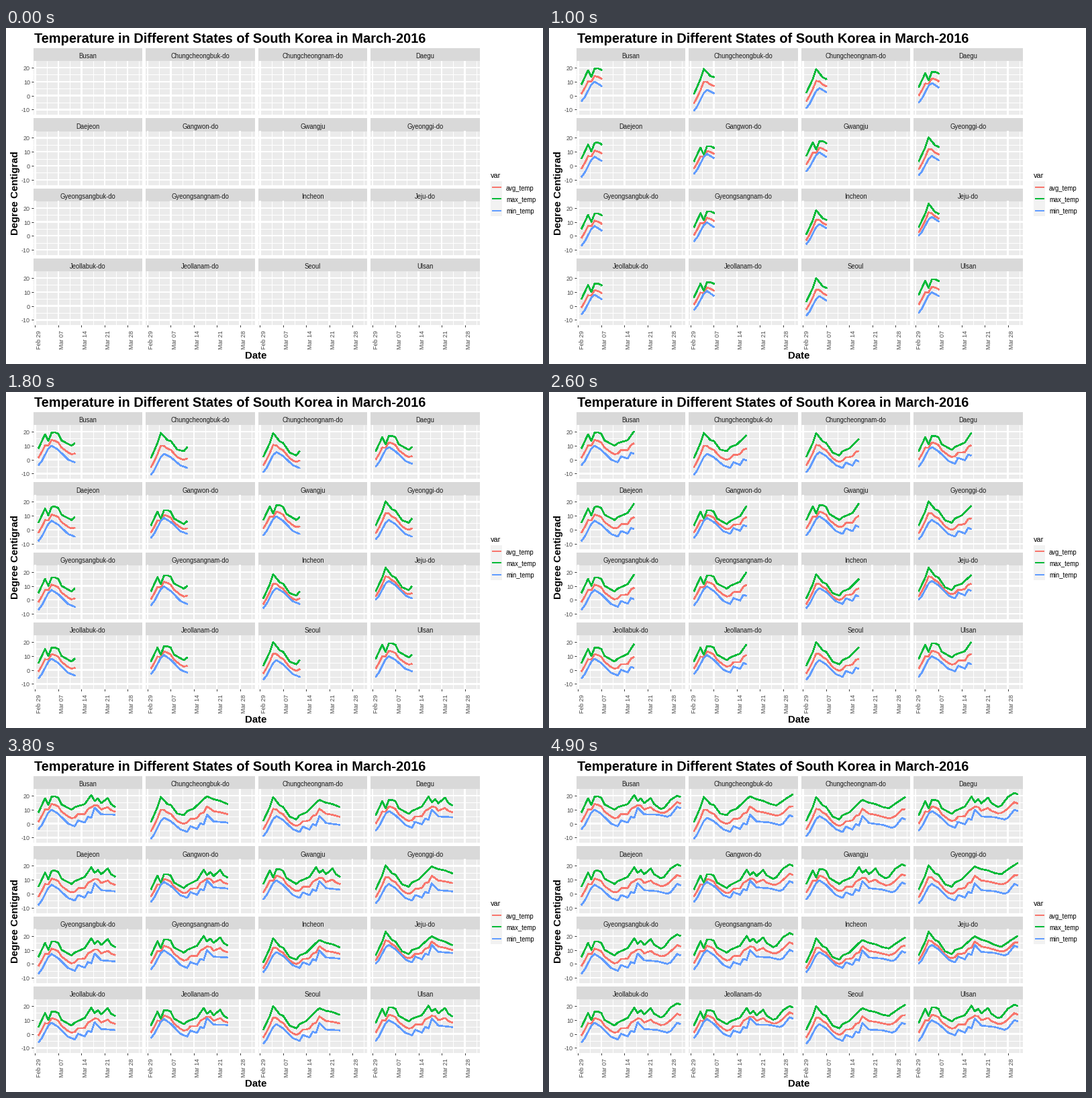
These frames come from a looping animation (800 px wide and 500 px high, 5 s). A matplotlib script:

```python
import numpy as np
import matplotlib.pyplot as plt
from matplotlib.animation import FuncAnimation
from matplotlib.collections import LineCollection
from matplotlib.patches import Rectangle

plt.rcParams["font.family"] = "Liberation Sans"

WIDTH, HEIGHT, DPI = 800, 500, 72
FRAMES, INTERVAL = 50, 100
DAYS = np.arange(1, 32)
WEEKS = range(0, 29, 7)
RED, GREEN, BLUE = "#F8766D", "#00BA38", "#619CFF"

LEFT, TOP = 41.0, 49.2
PITCH_X, PITCH_Y = 167.45, 104.33
PANEL_W, PANEL_H, STRIP_H = 162.3, 80.0, 19.2
DAY_MIN, DAY_SPAN = -0.5, 33
TEMP_MAX, TEMP_SPAN = 24.75, 38.5

# Turning points of the weather, day: degrees
WEST = {1: 3, 3: 13, 4: 20, 5: 17, 6: 14, 7: 13, 9: 6, 11: 4, 12: 7, 14: 9, 17: 16,
        18: 18, 20: 16, 22: 15, 24: 13, 26: 12, 29: 17, 31: 20}
EAST = {1: 6, 3: 16, 4: 11, 5: 17, 6: 17, 7: 16, 8: 11, 11: 7, 12: 9, 15: 12, 17: 19,
        18: 15, 19: 17, 20: 14, 22: 18, 23: 14, 25: 11, 26: 12, 28: 18, 30: 21, 31: 20}
LOWS = {1: -5, 2: -2, 4: 7, 5: 9, 7: 6, 10: -1, 12: -3, 13: 1, 15: -1, 16: 3, 17: 2,
        18: 9, 20: 4, 24: 3, 27: 1, 28: 2, 30: 8, 31: 7}

# Each state departs from that by a shift on these days, for highs and lows
SHIFT_DAYS = (1, 11, 27)
STATES = {
    "Busan": (EAST, (2, 3, -1), (1, 1, 4)),
    "Chungcheongbuk-do": (WEST, (-2, 2, 1), (-6, -3, -2)),
    "Chungcheongnam-do": (WEST, (-1, -1, -1), (-4, -3, -4)),
    "Daegu": (EAST, (0, 0, 1), (0, 0, 2)),
    "Daejeon": (EAST, (-1, 0, 0), (-3, -2, -1)),
    "Gangwon-do": (EAST, (-3, -3, 0), (-1, 0, 1)),
    "Gwangju": (EAST, (1, 0, 0), (1, 0, 0)),
    "Gyeonggi-do": (WEST, (0, 1, 2), (-2, -2, -1)),
    "Gyeongsangbuk-do": (EAST, (-1, -1, 0), (-2, -2, -1)),
    "Gyeongsangnam-do": (EAST, (0, 1, 1), (1, 0, 2)),
    "Incheon": (WEST, (-2, -1, -1), (-1, 0, 1)),
    "Jeju-do": (WEST, (3, 3, 0), (5, 4, 5)),
    "Jeollabuk-do": (EAST, (-1, -1, 1), (-1, -1, 0)),
    "Jeollanam-do": (EAST, (0, 0, -1), (2, 1, 4)),
    "Seoul": (WEST, (0, 0, 1), (-2, -2, 0)),
    "Ulsan": (EAST, (2, 2, 0), (0, 2, 2)),
}

fig = plt.figure(figsize=(WIDTH / DPI, HEIGHT / DPI), dpi=DPI, facecolor="white")
ax = fig.add_axes([0, 0, 1, 1])
ax.set(xlim=(0, WIDTH), ylim=(HEIGHT, 0))
ax.axis("off")


def panel_origin(index):
    row, col = divmod(index, 4)
    return LEFT + col * PITCH_X, TOP + row * PITCH_Y


def day_x(left, day):
    return left + (day - DAY_MIN) / DAY_SPAN * PANEL_W


def temp_y(top, temp):
    return top + (TEMP_MAX - temp) / TEMP_SPAN * PANEL_H


def rect(x, y, w, h, color):
    ax.add_patch(Rectangle((x, y), w, h, fc=color, lw=0, zorder=0))


def lines(segments, color, width, **style):
    ax.add_collection(LineCollection(segments, colors=color, linewidths=width,
                                     zorder=1, capstyle="butt", **style))


def label(x, y, text, size, **style):
    ax.text(x, y, text, fontsize=size, va="baseline", rotation_mode="anchor", **style)


def daily(points, shifts):
    base = np.interp(DAYS, list(points), list(points.values()))
    return base + np.interp(DAYS, SHIFT_DAYS, shifts)


def build_curves():
    curves = []
    for index, (highs, high_shift, low_shift) in enumerate(STATES.values()):
        left, top = panel_origin(index)
        high, low = daily(highs, high_shift), daily(LOWS, low_shift)
        mean = (high + low) / 2 - 0.6
        curves += [(left, temp_y(top, temps)) for temps in (mean, high, low)]
    return curves


def draw_panel(index, name):
    left, top = panel_origin(index)
    right, bottom = left + PANEL_W, top + PANEL_H
    rect(left, top - STRIP_H, PANEL_W, STRIP_H, "#D9D9D9")
    rect(left, top, PANEL_W, PANEL_H, "#EBEBEB")
    label(left + PANEL_W / 2, top - 4, name, 9.5, color="#1A1A1A", ha="center")

    def grid(temps, days, width, **style):
        across = [[(left, temp_y(top, t)), (right, temp_y(top, t))] for t in temps]
        upright = [[(day_x(left, d), top), (day_x(left, d), bottom)] for d in days]
        lines(across + upright, "white", width, **style)

    grid((-5, 5, 15), np.arange(3.5, 32, 7), 1)
    grid((-10, 0, 10, 20), WEEKS, 1.42, antialiaseds=False, snap=False)

    if index % 4 == 0:
        for temp in (-10, 0, 10, 20):
            y = temp_y(top, temp)
            lines([[(left - 3, y), (left, y)]], "#333333", 1)
            label(left - 5, y + 4, str(temp), 9, color="#4D4D4D", ha="right")
    if index >= 12:
        for day, text in zip(WEEKS, ("Feb 29", "Mar 07", "Mar 14", "Mar 21", "Mar 28")):
            x = day_x(left, day)
            lines([[(x, bottom), (x, bottom + 3)]], "#333333", 1)
            label(x + 8.5, 463.5, text, 9, color="#4D4D4D", ha="center", rotation=90)


def draw_legend():
    label(722, 223, "var", 11)
    for i, (text, color) in enumerate((("avg_temp", RED), ("max_temp", GREEN),
                                       ("min_temp", BLUE))):
        y = 237.1 + 17.28 * i
        rect(722, y - 8.64, 17.28, 17.28, "#F2F2F2")
        lines([[(723.7, y), (737.6, y)]], color, 2)
        label(745, y + 4.5, text, 9.5)


for number, state in enumerate(STATES):
    draw_panel(number, state)
draw_legend()
label(42, 22, "Temperature in Different States of South Korea in March-2016", 20,
      weight="bold")
label(372.5, 492, "Date", 15, weight="bold", ha="center")
label(18, 246, "Degree Centigrad", 15, weight="bold", ha="center", rotation=90)

curves = build_curves()
traces = LineCollection([], colors=[RED, GREEN, BLUE], linewidths=1.6,
                        antialiaseds=False, capstyle="butt", joinstyle="round", zorder=3)
ax.add_collection(traces)


def update(frame):
    """Reveal every curve up to the current, fractional day."""
    now = 1 + 30 * frame / (FRAMES - 1)
    days = np.append(DAYS[DAYS < now], now)
    traces.set_segments([] if frame == 0 else [
        np.column_stack([day_x(left, days), np.interp(days, DAYS, ys)])
        for left, ys in curves])
    return [traces]


anim = FuncAnimation(fig, update, frames=FRAMES, interval=INTERVAL,
                     repeat=True, repeat_delay=0)
plt.show()
```
